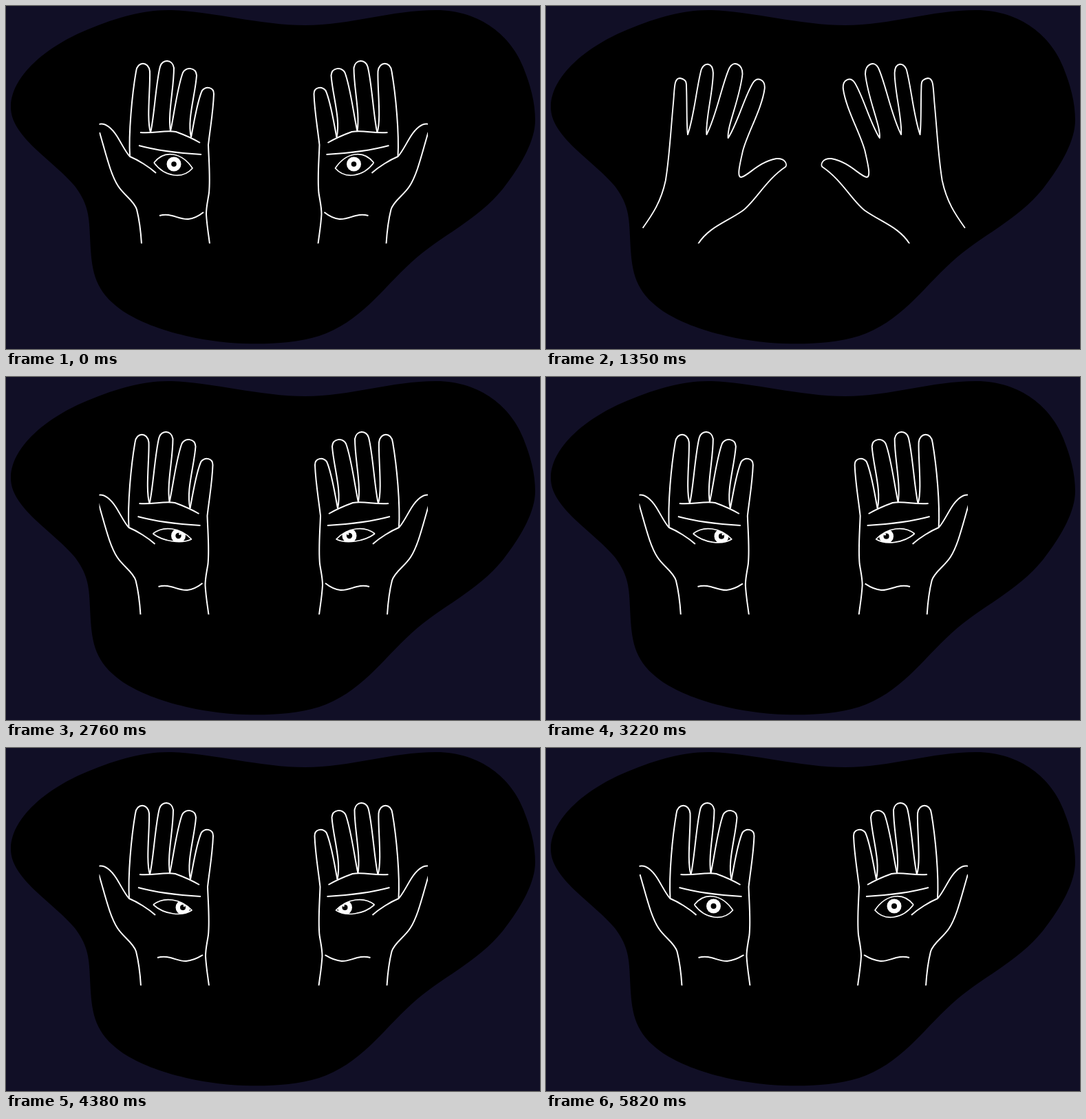
Animation of 776 by 499 pixels, one loop 5920 ms. Source, as an HTML page with a canvas:

```html
<!DOCTYPE html>
<html lang="en">
<head>
<meta charset="utf-8">
<title>Hands with eyes</title>
<style>
html, body { margin: 0; width: 100%; height: 100%; overflow: hidden; background: #110f26; }
canvas { display: block; }
</style>
</head>
<body>
<canvas id="stage" width="776" height="499"></canvas>
<script>
const ctx = document.getElementById('stage').getContext('2d');
const LOOP = 5920, MIRROR = 749.5, AXIS = 241;

const blob = new Path2D(`M7 145C9 100 60 60 110 38C155 18 200 5 240 6C300 8 370 28 435 28
  C500 28 560 6 625 6C690 6 735 45 752 90C762 115 769 140 769 166C769 195 750 230 722 266
  C685 312 630 335 590 372C545 413 515 460 455 480C420 491 380 492 345 491
  C270 488 190 465 155 432C125 405 124 375 122 335C121 300 117 285 100 262C70 225 5 190 7 145Z`);

const palm = [
  'M132 173C145 167 155 180 161 189C168 200 174 213 180 219C192 224 208 234 218 243',
  'M136 184C146 218 152 245 163 262C172 276 186 283 190 296C194 312 196 330 197 346',
  'M180 219C178 185 183 130 189 95C191 80 207 80 209 95C210 118 204 165 210 184',
  'M210 184C215 165 218 110 224 88C227 77 242 77 244 90C244 120 235 155 239 182',
  'M239 182C244 160 249 118 257 97C262 88 276 89 277 101C275 130 263 165 269 191',
  `M269 191C274 165 278 138 285 123C291 116 302 118 302 128C301 155 297 175 294 202
   C295 230 297 250 295 272C293 285 291 292 291 303C292 320 294 330 296 346`,
  'M195 184C215 186 230 180 247 183C258 187 270 192 282 199',
  'M193 203C215 209 250 214 284 216'
].map(d => new Path2D(d));

const back = [new Path2D(`M135 323C150 303 163 285 170 254C176 220 178 180 182 140
  C184 118 183 105 192 105C202 107 202 111 202 118C203 145 202 172 204 187
  C214 160 218 115 225 92C229 82 242 81 243 97C243 125 231 165 233 187
  C248 160 257 112 268 90C274 79 288 84 288 99C284 135 264 175 266 192
  C280 172 291 132 304 112C311 102 323 107 322 120C318 150 293 190 288 213
  C284 230 279 249 286 249C297 247 312 227 340 222C354 221 357 231 354 234
  C325 252 306 286 288 298C262 315 236 322 220 346`)];

// Ticks of the hand-drawn clock: first time, last time, steps
const ticks = [0];
for (const [from, to, n] of [[90, 670, 7], [750, 1230, 6], [1350, 1920, 7], [2000, 2570, 7],
  [2650, 3220, 7], [3330, 3330, 1], [3470, 4000, 7], [4080, 4660, 7], [4750, 5330, 7],
  [5430, 5620, 3], [5820, 5820, 1]]) {
  for (let i = 0; i < n; i++) ticks.push(n > 1 ? from + (to - from) * i / (n - 1) : from);
}

// tick, sway, crease shift, upper lid, lower lid, iris x, iris y, pupil radius
const keys = [
  [0, 0, 0, 16, 14, 244, 230, 3.8],
  [5, 0, 0, 16, 14, 244, 230, 3.8],
  [16, -1, 1, 2, 2, 245, 231, 5],
  [20, -1, 1, 6, 6, 245, 231, 5],
  [29, -1.5, 0, 11, 7, 252, 231, 4.2],
  [37, -1, 1, 11, 9, 258, 232, 4],
  [46, -1, 1, 11, 9, 258, 232, 4],
  [52, .5, 1, 16, 14, 243.5, 231.5, 4],
  [60, .5, 1, 16, 14, 243, 230, 4]
];

const ease = u => u * u * (3 - 2 * u);
const ramp = (x, a, b) => ease(Math.min(1, Math.max(0, (x - a) / (b - a))));

function poseAt(tick) {
  let i = 0;
  while (i < keys.length - 2 && tick >= keys[i + 1][0]) i++;
  const a = keys[i], b = keys[i + 1], u = ramp(tick, a[0], b[0]);
  const [, sway, crease, up, down, ix, iy, pupil] = a.map((v, j) => v + (b[j] - v) * u);
  return { sway, crease, up, down, ix, iy, pupil };
}

function disc(x, y, r, color) {
  ctx.fillStyle = color;
  ctx.beginPath();
  ctx.arc(x, y, r, 0, Math.PI * 2);
  ctx.fill();
}

function drawEye(p) {
  const lid = new Path2D(), u = p.up * 4 / 3, d = p.down * 4 / 3;
  lid.moveTo(215, 228);
  lid.bezierCurveTo(230, 230.5 - u, 255, 233.5 - u, 271, 236);
  lid.bezierCurveTo(257, 233.5 + d, 231, 230.5 + d, 215, 228);
  ctx.save();
  ctx.clip(lid);
  disc(p.ix, p.iy, 10.5, '#fff');
  disc(p.ix, p.iy, p.pupil, '#000');
  if (p.ix > 249) disc(p.ix + 2, p.iy - 2.5, 1.4, '#fff');
  ctx.restore();
  ctx.lineWidth = 1.7;
  ctx.stroke(lid);
}

function drawHand(p, turn) {
  const face = Math.cos(turn * Math.PI);
  ctx.translate(AXIS + p.sway * ramp(face, 0, 1), 0);
  ctx.scale(Math.max(.06, Math.abs(face)), 1);
  ctx.translate(-AXIS, 0);
  ctx.lineWidth = 2;
  (face < 0 ? back : palm).forEach(s => ctx.stroke(s));
  if (face < 0) return;
  const k = p.crease;
  ctx.stroke(new Path2D(`M${223 - 2 * k} 305C${240 - 2 * k} 300 250 311 ${265 - 2 * k} 310
    C275 309 282 304 287 ${300 + k}`));
  drawEye(p);
}

function draw(time) {
  let tick = ticks.length - 1;
  while (ticks[tick] > time) tick--;
  const pose = poseAt(tick);
  const turn = ramp(tick, 3, 8) - ramp(tick, 13, 18);

  ctx.fillStyle = '#110f26';
  ctx.fillRect(0, 0, 776, 499);
  ctx.fillStyle = '#000';
  ctx.fill(blob);

  ctx.save();
  ctx.beginPath();
  ctx.rect(135.5, 78, 477.5, 267.5);
  ctx.clip();
  ctx.strokeStyle = '#fff';
  ctx.lineJoin = 'round';
  for (const flip of [false, true]) {
    ctx.save();
    if (flip) ctx.transform(-1, 0, 0, 1, MIRROR, 0);
    drawHand(pose, turn);
    ctx.restore();
  }
  ctx.restore();
}

const start = performance.now();
function loop() {
  draw((performance.now() - start) % LOOP);
  requestAnimationFrame(loop);
}
loop();
</script>
</body>
</html>
```
